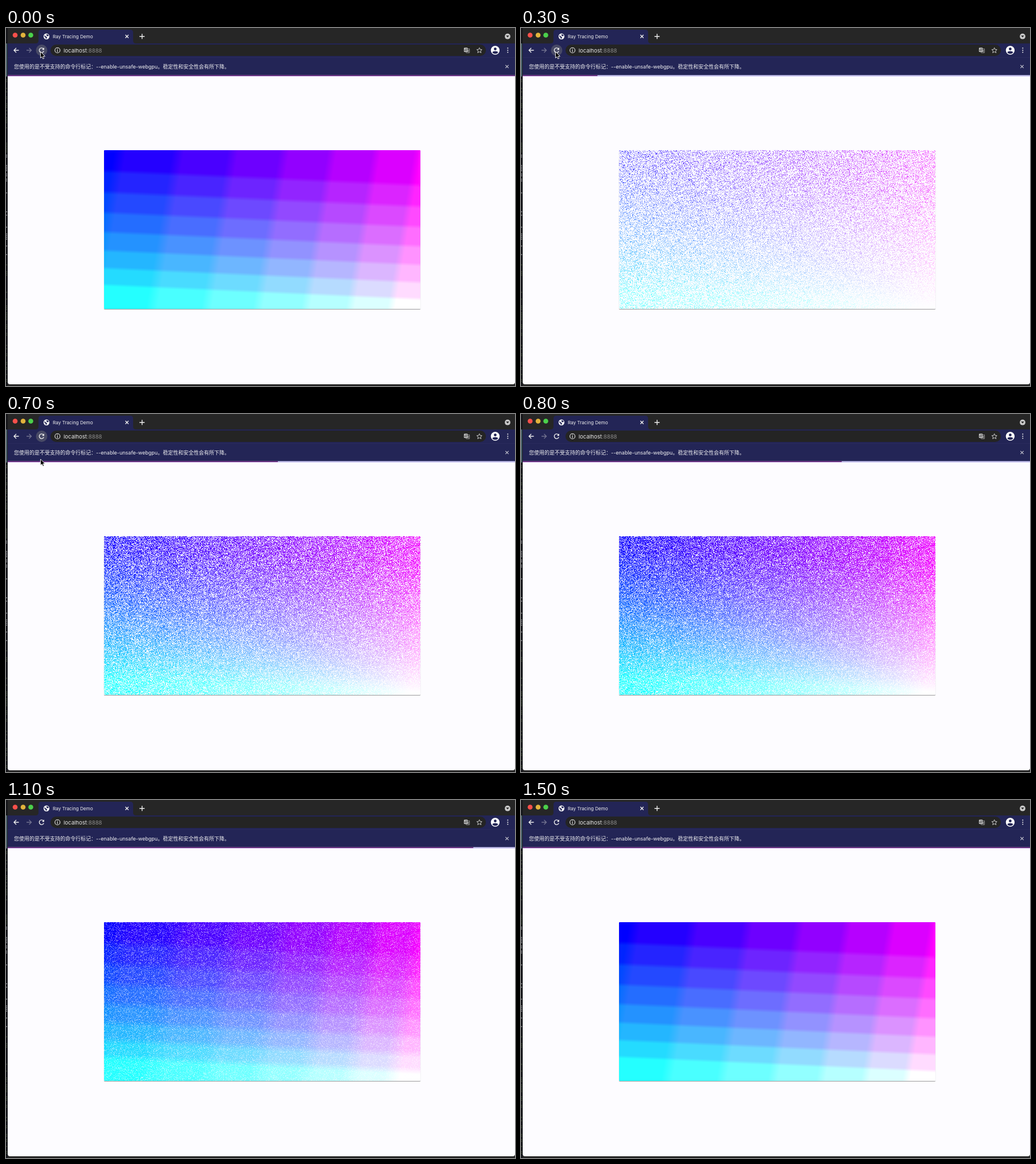
An HTML page with a canvas for the animation above (1600 ms loop, 893 px wide and 627 px high).

```html
<!DOCTYPE html>
<html lang="zh-CN">
<head>
<meta charset="utf-8">
<title>Ray Tracing Demo</title>
<style>
  html, body { margin: 0; width: 100%; height: 100%; overflow: hidden; background: #262626; }
  svg, canvas { position: absolute; left: 0; top: 0; }
  #render { left: 172px; top: 214px; background: #fefdff; border-radius: 1px; box-shadow: 0 1px 1px rgba(0, 0, 0, .4); }
  text { font-family: Inter, "Noto Sans CJK SC", "Noto Sans CJK", sans-serif; white-space: pre; }
  .line { fill: none; stroke: #eee; stroke-width: 1.4; }
</style>
</head>
<body>
<svg width="893" height="627">
  <rect width="893" height="627" fill="#262626"/>
  <g id="desktop"><rect width="3" height="627" fill="#15161a"/></g>

  <!-- tab strip -->
  <path d="M3 0H893V27H3Z" fill="#262626"/>
  <circle cx="16" cy="12.5" r="4.3" fill="#f9504b"/>
  <circle cx="30" cy="12.5" r="4.3" fill="#e2b33c"/>
  <circle cx="43.5" cy="12.5" r="4.3" fill="#4bd14b"/>
  <path d="M52 27Q57 27 57 22V8Q57 3 62 3H218Q223 3 223 8V22Q223 27 228 27Z" fill="#232556"/>
  <circle cx="71" cy="14.8" r="5.2" fill="#f2f2f5"/>
  <path d="M67 13l3 1.500 2 2-1 2.500-1.500-1-.5-2-2-1.500zM71 11l3 .5 1 2-2 1-2-1.500z" fill="#232556"/>
  <text x="82" y="17.800" font-size="8.2" fill="#eee">Ray Tracing Demo</text>
  <path class="line" d="M209.500 12l5.400 5.400m0-5.400l-5.400 5.400M234.200 14.700h9M238.700 10.200v9"/>
  <circle cx="880" cy="14.700" r="4.900" fill="#c9c9c9"/>
  <path d="M877.300 13.300h5.400l-2.700 3.200z" fill="#262626"/>

  <!-- toolbar and info bar -->
  <path d="M3 27H893V83H3Z" fill="#232556"/>
  <path d="M3 51.500H893" stroke="#2d2f60" stroke-width=".7"/>
  <rect x="78" y="29" width="764" height="20" rx="10" fill="#242424"/>
  <path class="line" d="M22.500 39h-8.500m4-4l-4 4 4 4"/>
  <path class="line" style="stroke:#71728f" d="M36 39h8.500m-4-4l4 4-4 4"/>
  <circle id="hover" cx="62.500" cy="39" r="10" fill="#484a66"/>
  <path class="line" d="M66.300 40.500a4.100 4.100 0 1 1-.8-4.300"/>
  <path d="M67 34.300v4h-4z" fill="#eee"/>
  <circle class="line" cx="90.300" cy="39" r="4.500" style="stroke-width:1.100"/>
  <path class="line" d="M90.300 36.300v1.200m0 1v3.200" style="stroke-width:1.200"/>
  <text x="101" y="42.500" font-size="9.6" fill="#e8e8e8">localhost<tspan fill="#8a8a8a">:8888</tspan></text>
  <rect x="803.500" y="34.500" width="6.500" height="7.500" rx="1" fill="#c8c8c8"/>
  <path d="M806 36.500h2.300v3.500h-3.300v-2h2" fill="none" stroke="#333" stroke-width=".8"/>
  <path class="line" d="M810.500 36.500h2.500v6.800h-5.500l-1-1.500M809.500 39h3m-1 0q-.5 2-2 3m.5-2l2 2" style="stroke:#b8b8b8;stroke-width:.8"/>
  <path class="line" d="M830.500 34.500l1.300 3.100 3.300.3-2.500 2.200.8 3.300-2.900-1.800-2.900 1.800.8-3.300-2.500-2.200 3.300-.3z" style="stroke:#d0d0d0;stroke-width:1"/>
  <circle cx="858.300" cy="39" r="7.700" fill="#fff"/>
  <path d="M853.300 43q0-2.600 5-2.600t5 2.600q-2 2.300-5 2.300t-5-2.300z" fill="#232556"/>
  <circle cx="858.300" cy="36.700" r="2.400" fill="#232556"/>
  <path d="M880.300 35.200v8" stroke="#eee" stroke-width="2" stroke-linecap="round" stroke-dasharray="0 3.700"/>
  <text x="14" y="71" font-size="9" fill="#f0f0f2">您使用的是不受支持的命令行标记：--enable-unsafe-webgpu。稳定性和安全性会有所下降。</text>
  <path class="line" d="M876.300 64.800l5.400 5.400m0-5.400l-5.400 5.400" style="stroke:#c5c5cf;stroke-width:1.200"/>

  <!-- page -->
  <path d="M3 83H893V620Q893 624 889 624H7Q3 624 3 620Z" fill="#fdfcff"/>
  <path d="M3 82.500H893V85H3Z" fill="#cbc7f2"/>
  <g id="bar">
    <rect x="0" y="82.500" width="890" height="1.500" fill="#561468"/>
    <rect x="0" y="84" width="890" height="1" fill="#d6bdf0"/>
  </g>
</svg>
<canvas id="render" width="555" height="278"></canvas>
<svg width="893" height="627">
  <path id="cursor" d="M0 0V11L2.600 8.700 4.300 12.500 6.200 11.700 4.600 8H8Z" fill="#000" stroke="#fff" stroke-width=".9"/>
</svg>
<script>
const $ = id => document.getElementById(id);
const clamp = (v, lo, hi) => Math.min(hi, Math.max(lo, v));
const canvas = $('render'), ctx = canvas.getContext('2d');
const { width: W, height: H } = canvas;
const image = ctx.createImageData(W, H);

let seed = 7;
function random() {
  seed = (seed + 0x6d2b79f5) | 0;
  let n = Math.imul(seed ^ seed >>> 15, 1 | seed);
  n ^= n + Math.imul(n ^ n >>> 7, 61 | n);
  return ((n ^ n >>> 14) >>> 0) / 4294967296;
}

// Slivers of the window behind the browser
let specks = '<path d="M0 27h2v58H0z" fill="#4d6570"/>';
for (let y = 90; y < 620; y += 3) {
  if (random() < .45) specks += `<rect y="${y}" width="2" height="1.500" fill="${y > 220 && y < 400 ? '#85858a' : '#37402f'}"/>`;
}
$('desktop').innerHTML += specks;

// Each pixel has a moment around which its rays are traced
const order = Float32Array.from({ length: W * H }, random);
const red = new Float32Array(W * H), green = new Float32Array(W * H);
for (let y = 0, i = 0; y < H; y++) {
  for (let x = 0; x < W; x++, i++) {
    const across = x - 28 + 47 * y / H, down = y - 36 - 25 * x / W;
    red[i] = 1 + (105 - Math.sqrt(11025 - 12 * across)) / 6;
    green[i] = 1 + (38 - Math.sqrt(1444 - 3.2 * down)) / 1.6;
  }
}

// Eight colour levels; softness 1 gives a continuous ramp
function shade(level, softness) {
  const step = Math.round(level);
  const value = step - 1 + clamp((level - step) / softness + .5, 0, 1);
  return clamp(value, 0, 7) * 255 / 7;
}

function paint(progress) {
  const covered = progress ** .9, softness = 1 - .8 * progress ** 4;
  const data = image.data;
  for (let i = 0; i < order.length; i++) {
    const p = i * 4;
    data[p] = shade(red[i], softness);
    data[p + 1] = shade(green[i], softness);
    data[p + 2] = 255;
    const filled = (covered - order[i]) * 1.8 + .5;
    data[p + 3] = progress === 0 ? 0 : progress === 1 ? 255 : 255 * clamp(filled, 0, 1);
  }
  ctx.putImageData(image, 0, 0);
}

let shown = -1;
function frame() {
  const time = Math.floor(performance.now() % 1600 / 100) * 100;
  if (time !== shown) {
    shown = time;
    const progress = time === 0 || time >= 1200 ? 1 : clamp((time - 147) * .000963, 0, 1);
    paint(progress);
    $('bar').setAttribute('transform', `translate(3 0) scale(${progress} 1)`);
    $('hover').style.display = time < 800 ? '' : 'none';
    $('cursor').style.display = time < 800 ? '' : 'none';
    $('cursor').setAttribute('transform', `translate(60.500 ${time < 600 ? 41.500 : time < 700 ? 48 : 79})`);
  }
  requestAnimationFrame(frame);
}
frame();
</script>
</body>
</html>
```
